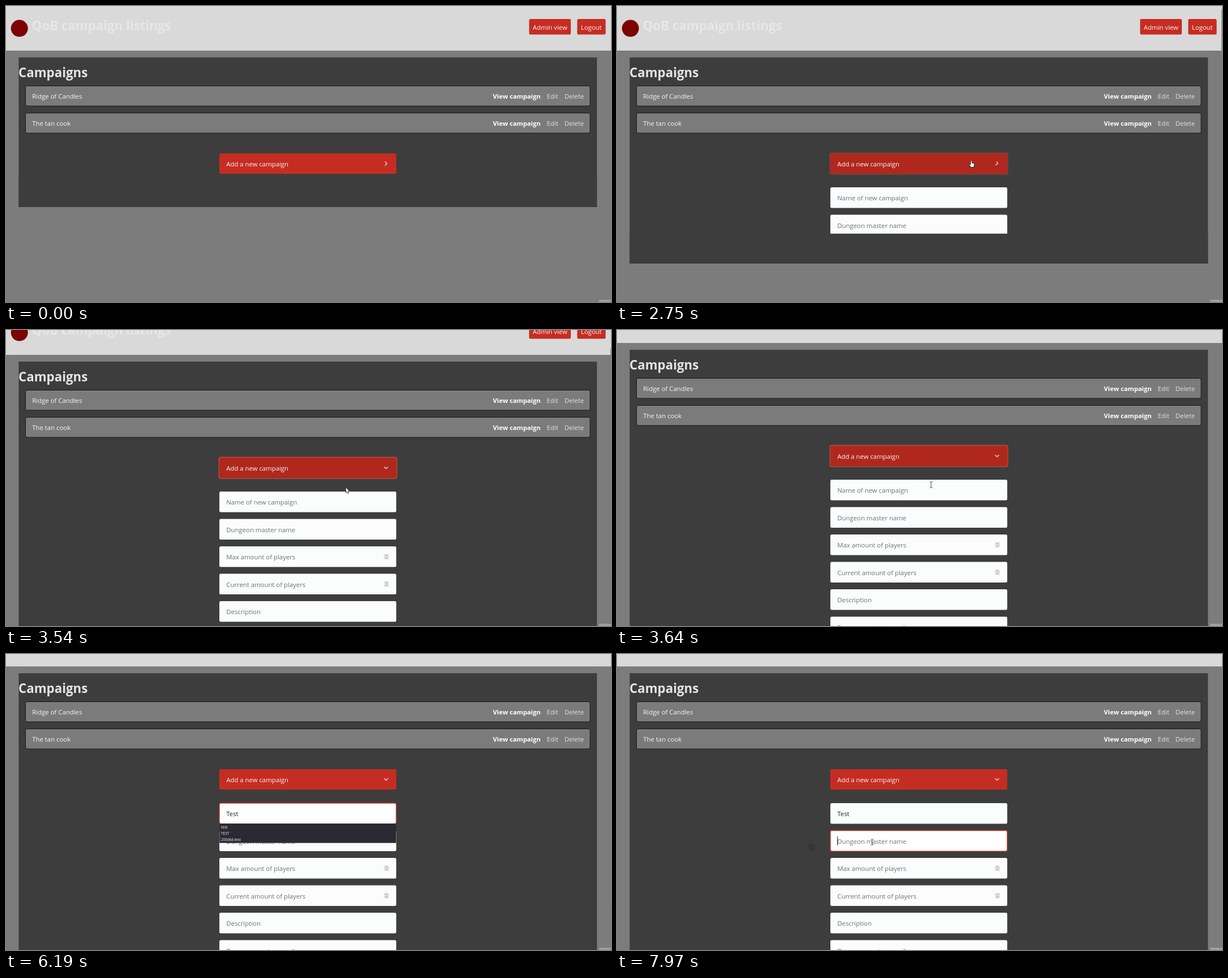
Recreate the animation shown at these times as an HTML page. Size 1069x524 px, loop 8 s.

```html
<!DOCTYPE html>
<html lang="en">
<head>
<meta charset="utf-8">
<title>Campaign listings</title>
<style>
  html, body { margin: 0; width: 100%; height: 100%; overflow: hidden; background: #7c7c7c; }
  svg { display: block; width: 1069px; height: 524px; }
  text { font: 11.35px "Open Sans", "Noto Sans", sans-serif; fill: #f6f6f6; white-space: pre; }
  .big { font-size: 22.3px; font-weight: 700; fill: #e4e4e4; }
  .strong { font-size: 11.25px; font-weight: 700; fill: #fff; }
  .link { fill: #e2e2e2; }
  .hint { fill: #6b727a; }
  .typed { fill: #212529; }
  .tiny { font-size: 6.5px; }
  .red { fill: #c62d22; }
  .line { fill: none; stroke-linecap: round; stroke-linejoin: round; }

  /* Every part shares one 8 s clock; 1% is 80 ms. */
  .page, .cover, .chevron, .thumb, .fade, .flip, .caret, .cursor {
    animation: 8s step-end infinite;
  }

  .page { animation-name: scroll; }
  @keyframes scroll {
    0% { transform: translateY(0); }
    44.2% { transform: translateY(-35px); }
    45.4% { transform: translateY(-56px); }
    46.6%, 100% { transform: translateY(-57px); }
  }
  .thumb { animation-name: thumb; }
  @keyframes thumb {
    0% { opacity: 0; transform: translateY(0); }
    34.3% { opacity: 1; transform: translateY(0); }
    44.2% { opacity: 1; transform: translateY(27px); }
    45.4%, 100% { opacity: 1; transform: translateY(44px); }
  }

  .cover { animation-name: open; }
  @keyframes open {
    0% { transform: translateY(0); }
    33.1% { transform: translateY(0); animation-timing-function: steps(4); }
    38%, 100% { transform: translateY(400px); }
  }
  .chevron { animation-name: turn; }
  @keyframes turn {
    0% { transform: rotate(0); }
    33.1% { transform: rotate(0); animation-timing-function: steps(4); }
    38%, 100% { transform: rotate(90deg); }
  }

  .hover { animation-name: hover; }
  @keyframes hover {
    0% { opacity: 0; }
    30.6% { opacity: .6; }
    31.8% { opacity: 1; }
    50.3% { opacity: 1; animation-timing-function: steps(3); }
    53.8%, 100% { opacity: 0; }
  }
  .ring { animation-name: ring; }
  @keyframes ring {
    0% { opacity: 0; }
    33.1% { opacity: 0; animation-timing-function: steps(2); }
    35.5% { opacity: 1; }
    50.3% { opacity: 1; animation-timing-function: steps(3); }
    53.8%, 100% { opacity: 0; }
  }
  .focus1 { animation-name: focus1; }
  @keyframes focus1 {
    0% { opacity: 0; }
    50.3% { opacity: 0; animation-timing-function: steps(3); }
    53.8% { opacity: 1; }
    83.6% { opacity: 1; animation-timing-function: steps(2); }
    86% { opacity: 0; }
    100% { opacity: 0; }
  }
  .focus2 { animation-name: focus2; }
  @keyframes focus2 {
    0% { opacity: 0; }
    96% { opacity: 0; animation-timing-function: steps(3); }
    99.6%, 100% { opacity: 1; }
  }

  .hint1 { animation-name: hint1; }
  @keyframes hint1 { 0% { opacity: 1; } 63.9%, 100% { opacity: 0; } }
  .key1 { animation-name: key1; }
  @keyframes key1 { 0% { fill-opacity: 0; } 63.9%, 100% { fill-opacity: 1; } }
  .key2 { animation-name: key2; }
  @keyframes key2 { 0% { fill-opacity: 0; } 66.3%, 100% { fill-opacity: 1; } }
  .key3 { animation-name: key3; }
  @keyframes key3 { 0% { fill-opacity: 0; } 68.7%, 100% { fill-opacity: 1; } }
  .key4 { animation-name: key4; }
  @keyframes key4 { 0% { fill-opacity: 0; } 71.2%, 100% { fill-opacity: 1; } }
  .list { animation-name: list; }
  @keyframes list { 0% { opacity: 0; } 63.9% { opacity: 1; } 84.8%, 100% { opacity: 0; } }
  .more { animation-name: more; }
  @keyframes more { 0% { opacity: 0; } 67.5%, 100% { opacity: 1; } }

  .caret1 { animation-name: caret1; }
  @keyframes caret1 {
    0% { opacity: 0; transform: translateX(0); }
    51.4% { opacity: 1; transform: translateX(0); }
    57.6% { opacity: 0; transform: translateX(0); }
    63.9% { opacity: 1; transform: translateX(6px); }
    66.3% { opacity: 1; transform: translateX(11px); }
    68.7% { opacity: 1; transform: translateX(16px); }
    71.2% { opacity: 1; transform: translateX(20px); }
    77.3% { opacity: 0; transform: translateX(20px); }
    83.6% { opacity: 1; transform: translateX(20px); }
    84.8%, 100% { opacity: 0; transform: translateX(20px); }
  }
  .caret2 { animation-name: caret2; }
  @keyframes caret2 { 0% { opacity: 0; } 97.2%, 100% { opacity: 1; } }
  .spot { animation-name: spot; }
  @keyframes spot { 0% { opacity: 0; } 83.6%, 100% { opacity: 1; } }

  .cursor { animation-name: move; }
  @keyframes move {
    0% { transform: translate(954px, 465px); }
    1.5% { transform: translate(954px, 465px); animation-timing-function: steps(5); }
    9% { transform: translate(850px, 284px); }
    14.9% { transform: translate(850px, 284px); animation-timing-function: steps(4); }
    20.2% { transform: translate(759px, 225px); animation-timing-function: steps(3); }
    24.2% { transform: translate(870px, 164px); }
    25.6% { transform: translate(878px, 162px); animation-timing-function: steps(4); }
    30.6% { transform: translate(630px, 275px); }
    31.8% { transform: translate(626px, 273px); }
    41.7% { transform: translate(626px, 274px); }
    44.2% { transform: translate(600px, 278px); }
    45.4% { transform: translate(555px, 274px); }
    46.6% { transform: translate(520px, 278px); }
    47.7% { transform: translate(500px, 282px); }
    48.9% { transform: translate(493px, 284px); }
    81.2% { transform: translate(356px, 338px); }
    82.4% { transform: translate(345px, 340px); }
    83.6% { transform: translate(341px, 341px); }
    87.2% { transform: translate(352px, 340px); }
    88.4% { transform: translate(372px, 337px); }
    89.7% { transform: translate(392px, 335px); }
    90.9% { transform: translate(411px, 334px); }
    92.3% { transform: translate(425px, 334px); }
    93.6% { transform: translate(440px, 333px); }
    94.8%, 100% { transform: translate(451px, 333px); }
  }
  .arrow { animation-name: arrow; }
  @keyframes arrow {
    0% { opacity: 0; } 1.5% { opacity: 1; }
    24.2% { opacity: 0; } 26.8% { opacity: 1; }
    30.6% { opacity: 0; } 44.2% { opacity: 1; }
    45.4% { opacity: 0; } 81.2% { opacity: 1; }
    89.7%, 100% { opacity: 0; }
  }
  .hand { animation-name: hand; }
  @keyframes hand {
    0% { opacity: 0; } 24.2% { opacity: 1; }
    26.8% { opacity: 0; } 30.6% { opacity: 1; }
    44.2%, 100% { opacity: 0; }
  }
  .beam { animation-name: beam; }
  @keyframes beam {
    0% { opacity: 0; } 45.4% { opacity: 1; }
    63.9% { opacity: 0; } 89.7%, 100% { opacity: 1; }
  }
</style>
</head>
<body>
<svg viewBox="0 0 1069 524">
  <defs>
    <g id="row">
      <rect x="34.5" y="141.5" width="997.5" height="35.5" rx="3" fill="#7b7b7b" stroke="#161616"/>
      <text class="strong" x="860.3" y="164">View campaign</text>
      <text class="link" x="955.5" y="164">Edit</text>
      <text class="link" x="986.8" y="164">Delete</text>
    </g>
    <rect id="field" x="377" y="321" width="312.5" height="36.6" rx="2.5"/>
    <g id="spinner">
      <rect x="667.5" y="334" width="9.5" height="10.5" rx="1" fill="#e8e8eb"/>
      <path class="line" d="M670.3 338l2-1.8 2 1.8M670.3 340.7l2 1.8 2-1.8" stroke="#77777c" stroke-width=".9"/>
    </g>
  </defs>

  <rect width="1069" height="524" fill="#7c7c7c"/>

  <g class="page">
    <rect width="1069" height="79" fill="#d9d9d9"/>
    <circle cx="23.7" cy="39.6" r="15" fill="#7d0303"/>
    <text class="big" x="45.5" y="43" style="fill:#e7e7e7">QoB campaign listings</text>
    <rect class="red" x="924.3" y="23" width="73.7" height="27.5" rx="2.5"/>
    <text x="930.8" y="42">Admin view</text>
    <rect class="red" x="1009.3" y="23" width="50.2" height="27.5" rx="2.5"/>
    <text x="1015.8" y="42">Logout</text>

    <rect x="22.4" y="91" width="1021.8" height="900" fill="#3d3d3d"/>
    <text class="big" x="22" y="125.5">Campaigns</text>
    <use href="#row"/>
    <text x="46.3" y="164">Ridge of Candles</text>
    <use href="#row" y="48"/>
    <text x="46.3" y="212">The tan cook</text>

    <g fill="#fbfdfd">
      <use href="#field"/>
      <use href="#field" y="48.5"/>
      <use href="#field" y="97"/>
      <use href="#field" y="145.5"/>
      <use href="#field" y="194"/>
      <use href="#field" y="242.5"/>
    </g>
    <g fill="#fff" stroke="#c5362c" stroke-width="1.4">
      <g class="fade focus1"><use href="#field"/></g>
      <g class="fade focus2"><use href="#field" y="48.5"/></g>
    </g>
    <text class="hint flip hint1" x="389.3" y="344">Name of new campaign</text>
    <text class="hint" x="389.3" y="392.5">Dungeon master name</text>
    <text class="hint" x="389.3" y="441">Max amount of players</text>
    <text class="hint" x="389.3" y="489.5">Current amount of players</text>
    <text class="hint" x="389.3" y="538">Description</text>
    <text class="hint" x="389.3" y="586.5">Dungeon master email</text>
    <use href="#spinner" y="97"/>
    <use href="#spinner" y="145.5"/>
    <text class="typed" x="389.3" y="344"><tspan class="flip key1">T</tspan><tspan class="flip key2">e</tspan><tspan class="flip key3">s</tspan><tspan class="flip key4">t</tspan></text>
    <rect class="caret caret1" x="389" y="331" width="1" height="16" fill="#222"/>
    <rect class="caret caret2" x="389" y="380" width="1" height="16" fill="#222"/>

    <g class="flip list">
      <rect x="377.3" y="357.3" width="312" height="23" fill="#2b2a33"/>
      <text class="tiny" x="380" y="366">test</text>
      <text class="tiny" x="380" y="377">TEST</text>
      <g class="flip more">
        <rect x="377.3" y="380" width="312" height="11.5" fill="#2b2a33"/>
        <text class="tiny" x="380" y="388.3">200dtd-test</text>
      </g>
    </g>

    <!-- Slides down to uncover the form while the panel grows. -->
    <g class="cover">
      <rect y="356" width="1069" height="700" fill="#7c7c7c"/>
      <rect x="22.4" y="303" width="1021.8" height="53" fill="#3d3d3d"/>
    </g>

    <rect class="red" x="377" y="261" width="312.6" height="36" rx="2.5"/>
    <rect class="fade hover" x="377" y="261" width="312.6" height="36" rx="2.5" fill="#b0281d"/>
    <rect class="fade ring" x="376.2" y="260.2" width="314.4" height="37.8" rx="3" fill="none" stroke="#b84a3d" stroke-width="1.4"/>
    <text x="389.3" y="284">Add a new campaign</text>
    <g transform="translate(671.5 279)">
      <path class="line chevron" d="M-1.5-3L1.5 0-1.5 3" stroke="#f2e4e2" stroke-width="1.2"/>
    </g>
  </g>

  <rect class="thumb" x="1068" y="6" width="1" height="400" fill="#808080"/>
  <rect x="1048" y="520" width="21" height="4" fill="#a59c9c"/>
  <circle class="flip spot" cx="343.5" cy="342" r="6.5" fill="#363636"/>

  <g class="cursor">
    <path class="flip arrow" d="M.4.6V10l2.2-2 1.5 3.4 1.6-.7L4.3 7.4h3z" fill="#fff" stroke="#161616" stroke-width=".8"/>
    <path class="flip hand" d="M-1.3 1.3Q0-.5 1.3 1.3V4.8l3.2.8Q5.6 6 5.4 7.4L4.7 10.3v2.2H-1.5V11L-3.8 7.9Q-3.6 6.4-2.4 7l1.1 1z" fill="#fff" stroke="#161616" stroke-width=".9"/>
    <path class="line flip beam" d="M-2-5.2Q0-5.2 0-4.2 0-5.2 2-5.2M0-4.2V4.2M-2 5.2Q0 5.2 0 4.2 0 5.2 2 5.2" stroke="#4a4a4a"/>
  </g>
</svg>
</body>
</html>
```
